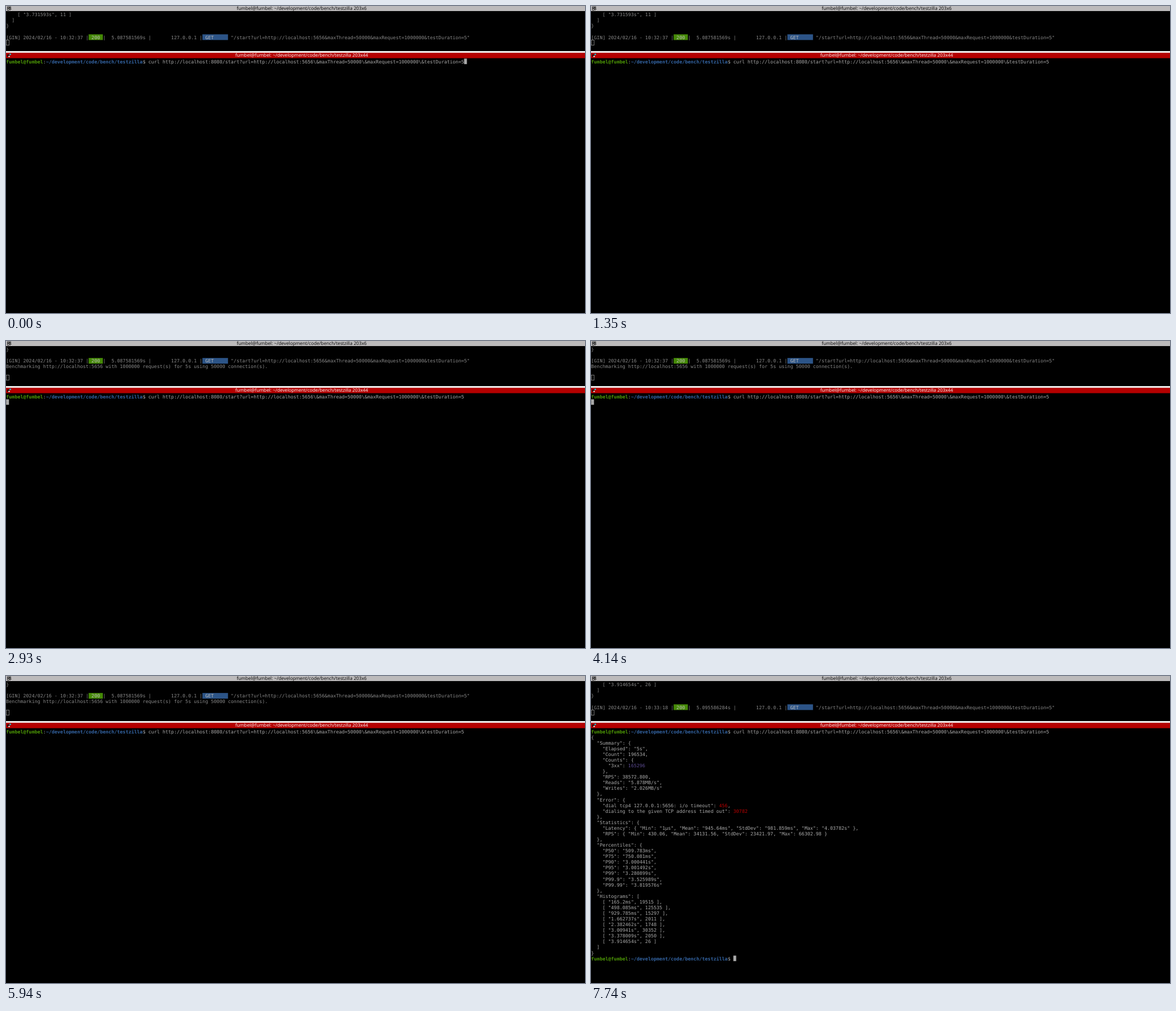
An HTML page with a canvas for the animation above (8 s loop, 1027 by 545 pixels).

```html
<!DOCTYPE html>
<html lang="en">
<head>
<meta charset="utf-8">
<title>Terminal benchmark</title>
<style>
html, body { margin: 0; width: 100%; height: 100%; overflow: hidden; background: #000; }
canvas { display: block; }
</style>
</head>
<body>
<canvas id="stage" width="1027" height="545"></canvas>
<script>
const ctx = document.getElementById('stage').getContext('2d');
const W = 1027, H = 545, LOOP = 8000;
const X0 = 0.25, CELL = 5.045, LINE = 10.075, BASE = 8.2;
const TOP_Y = 10, MAIN_Y = 93.4;
const MONO = '8.38px "DejaVu Sans Mono", monospace';
const SANS = '8.25px "Open Sans", "Noto Sans", sans-serif';
const FG = '#aaaaaa', DIM = '#888888', WHITE = '#bebebd';
const GREEN = '#4e9a06', BLUE = '#3465a4', RED = '#b80000', PURPLE = '#5b4a90';

const PATH = '~/development/code/bench/testzilla';
const USER = 'fumbel@fumbel';
const COMMAND = 'curl http://localhost:8080/start?url=http://localhost:5656' +
  '\\&maxThread=50000\\&maxRequest=1000000\\&testDuration=5';
const QUERY = '"/start?url=http://localhost:5656&maxThread=50000&maxRequest=1000000&testDuration=5"';

// Times in ms
const ENTER = 1740, STARTED = 1770, DONE = 6850;
const BLINKS = [150, 750, 1350, ENTER, 2330, 2930, 3540, 4140, 4750, 5330, 5940, 6540, 7140, 7740];

// A row is a list of segments: [text, colour, background, bold]
const prompt = [[USER, GREEN, null, true], [':', FG], [PATH, BLUE, null, true], ['$ ', FG]];
const PROMPT_COLS = prompt.reduce((n, s) => n + s[0].length, 0);
const dim = text => [[text, DIM]];
const logRow = (clock, took) => [
  [`[GIN] 2024/02/16 - ${clock} |`, DIM],
  [' 200 ', WHITE, '#458a07'],
  [`|  ${took} |       127.0.0.1 |`, DIM],
  [' GET     ', WHITE, '#2c5487'],
  [' ' + QUERY, DIM]
];

const oldLog = logRow('10:32:37', '5.087581569s');
const newLog = logRow('10:33:18', '5.095586284s');
const tail = (entry, log) => [dim(`    [ ${entry} ]`), dim('  ]'), dim('}'), [], log];
const idleRows = tail('"3.731593s", 11', oldLog);
const busyRows = [
  dim('}'), [], oldLog,
  dim('Benchmarking http://localhost:5656 with 1000000 request(s) for 5s using 50000 connection(s).')
];
const doneRows = tail('"3.914654s", 26', newLog);

// Numbers between {{ }} are highlighted
const report = `{
  "Summary": {
    "Elapsed": "5s",
    "Count": 196534,
    "Counts": {
      "3xx": {{165296}}
    },
    "RPS": 38572.800,
    "Reads": "5.878MB/s",
    "Writes": "2.026MB/s"
  },
  "Error": {
    "dial tcp4 127.0.0.1:5656: i/o timeout": {{456}},
    "dialing to the given TCP address timed out": {{30782}}
  },
  "Statistics": {
    "Latency": { "Min": "1µs", "Mean": "945.64ms", "StdDev": "981.859ms", "Max": "4.03782s" },
    "RPS": { "Min": 430.06, "Mean": 34131.56, "StdDev": 23421.97, "Max": 66302.98 }
  },
  "Percentiles": {
    "P50": "509.783ms",
    "P75": "750.081ms",
    "P90": "3.000441s",
    "P95": "3.001492s",
    "P99": "3.280899s",
    "P99.9": "3.525989s",
    "P99.99": "3.819576s"
  },
  "Histograms": [
    [ "165.2ms", 19515 ],
    [ "498.085ms", 125535 ],
    [ "929.785ms", 15297 ],
    [ "1.662737s", 2011 ],
    [ "2.382462s", 1748 ],
    [ "3.00941s", 30352 ],
    [ "3.378009s", 2050 ],
    [ "3.914654s", 26 ]
  ]
}`.split('\n').map(line => line.split(/\{\{|\}\}/).map((text, i) =>
  [text, i === 1 ? (line.includes('3xx') ? PURPLE : RED) : FG]));

const commandRow = [...prompt, [COMMAND, FG]];

function rect(x, y, w, h, color) {
  ctx.fillStyle = color;
  ctx.fillRect(x, y, w, h);
}

function drawRow(row, y) {
  let col = 0;
  for (const [text, color, back, bold] of row) {
    if (back) rect(X0 + col * CELL, y, text.length * CELL, LINE, back);
    ctx.fillStyle = color;
    ctx.font = (bold ? 'bold ' : '') + MONO;
    for (const ch of text) {
      if (ch !== ' ') ctx.fillText(ch, X0 + col * CELL, y + BASE);
      col++;
    }
  }
}

const drawRows = (rows, y) => rows.forEach((row, i) => drawRow(row, y + i * LINE));

function titleBar(y, h, back, color, size) {
  rect(0, y, W, h, back);
  ctx.font = SANS;
  ctx.fillStyle = color;
  ctx.textAlign = 'center';
  ctx.fillText(`${USER}: ${PATH} ${size}`, 524.5, y + 7.3);
  ctx.textAlign = 'left';
}

function icons() {
  ctx.lineWidth = 1;
  ctx.strokeStyle = '#333';
  ctx.strokeRect(2.5, 1.5, 3, 2);
  ctx.strokeRect(2.5, 4.5, 3, 3);
  ctx.strokeRect(6.5, 1.5, 2, 2);
  rect(6, 5, 4, 1, '#333');
  rect(7, 4, 1, 4, '#333');
  rect(2, 86, 4, 4, '#300');
  rect(6, 84.5, 3, 2.5, '#28b4c0');
  rect(4, 88.5, 3, 2, '#ddd');
}

function draw(t) {
  rect(0, 0, W, H, '#000');
  titleBar(0, 9, '#bcbabb', '#000', '203x6');
  rect(0, 80, W, 3, '#f0eeec');
  titleBar(83, 9.6, '#b40000', '#fff', '203x44');
  icons();

  drawRows(t < STARTED ? idleRows : t < DONE ? busyRows : doneRows, TOP_Y);
  ctx.strokeStyle = '#737373';
  ctx.strokeRect(0.5, 60.5, 5, 9);

  drawRow(commandRow, MAIN_Y);
  let col = PROMPT_COLS + COMMAND.length, line = 0;
  if (t >= DONE) {
    drawRows([...report, prompt], MAIN_Y + LINE);
    col = PROMPT_COLS;
    line = report.length + 1;
  } else if (t >= ENTER) {
    col = 0;
    line = 1;
  }
  const cursorOn = BLINKS.filter(b => t >= b).length % 2 === 0;
  if (cursorOn) rect(X0 + col * CELL, MAIN_Y + line * LINE, CELL, LINE - 0.3, FG);
}

ctx.textRendering = 'geometricPrecision';
const start = performance.now();
function frame() {
  draw((performance.now() - start) % LOOP);
  requestAnimationFrame(frame);
}
frame();
</script>
</body>
</html>
```
